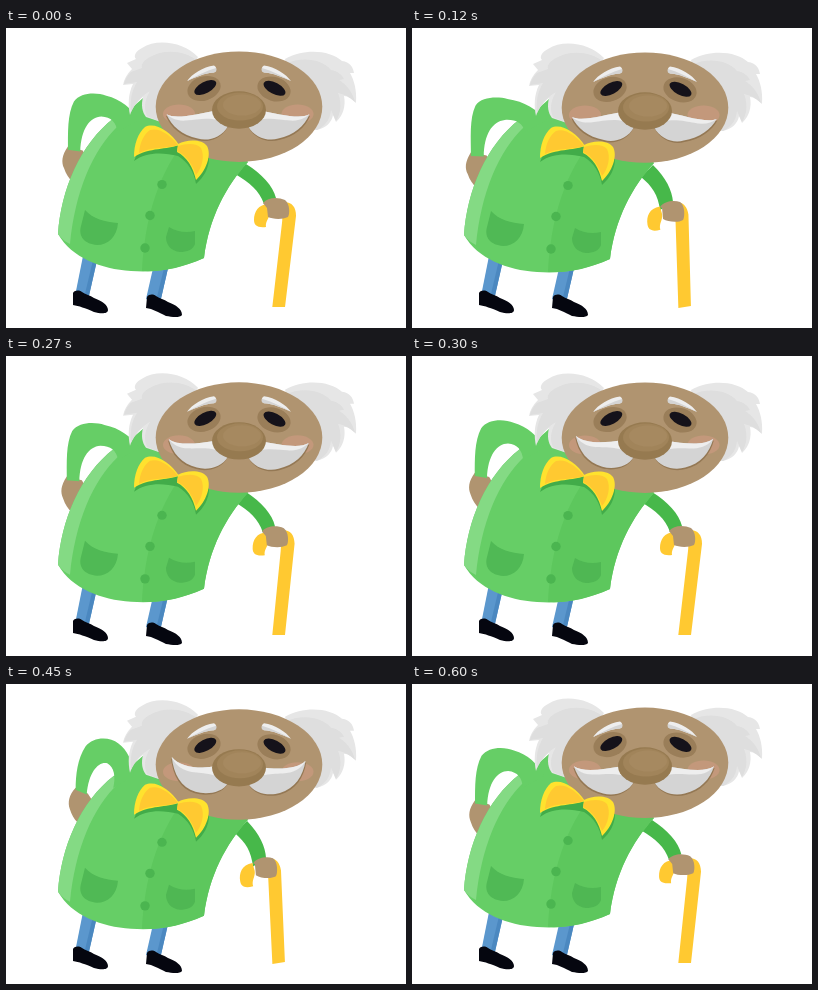
Animation, 400 px wide and 300 px high, one loop 0.63 s. Source, as an HTML page with a canvas:

```html
<!DOCTYPE html>
<html lang="en">
<head>
<meta charset="utf-8">
<title>Old man with a cane</title>
<style>
html, body { margin: 0; width: 400px; height: 300px; overflow: hidden; background: #fff; }
canvas { display: block; }
</style>
</head>
<body>
<canvas id="stage" width="400" height="300"></canvas>
<script>
const ctx = document.getElementById('stage').getContext('2d');
const LOOP = 630, STEP = 30;
const GREEN = '#66ce66', GREEN_SIDE = '#5dc75d', GREEN_DARK = '#4bb550';
const SKIN = '#b09470', SKIN_DARK = '#9a7e59', YELLOW = '#ffe22e', AMBER = '#ffc931';
const HAIR_BACK = '#e6e6e6', HAIR_FRONT = '#dedede';
const NUMBER = /-?\d+(\.\d+)?/g;

function shape(color, d) {
  ctx.fillStyle = color;
  ctx.fill(new Path2D(d));
}

function oval(color, x, y, rx, ry, tilt = 0) {
  ctx.fillStyle = color;
  ctx.beginPath();
  ctx.ellipse(x, y, rx, ry, tilt * Math.PI / 180, 0, Math.PI * 2);
  ctx.fill();
}

function mirrored(width, paint) {
  ctx.save();
  ctx.translate(width, 0);
  ctx.scale(-1, 1);
  paint();
  ctx.restore();
}

// Blends two paths that share the same commands.
function morph(from, to, k) {
  const ends = to.match(NUMBER);
  let i = 0;
  return from.replace(NUMBER, v => (+v + (ends[i++] - v) * k).toFixed(2));
}

// Smooth looping curve through [time, value] keys.
function curve(keys, t) {
  const n = keys.length;
  const at = i => {
    const [time, value] = keys[(i + n) % n];
    return [time + Math.floor(i / n) * LOOP, value];
  };
  const i = keys.findLastIndex(key => key[0] <= t);
  const [a, b, c, d] = [at(i - 1), at(i), at(i + 1), at(i + 2)];
  const span = c[0] - b[0], u = (t - b[0]) / span;
  const m0 = (c[1] - a[1]) / (c[0] - a[0]) * span;
  const m1 = (d[1] - b[1]) / (d[0] - b[0]) * span;
  const u2 = u * u, u3 = u2 * u;
  return b[1] * (2 * u3 - 3 * u2 + 1) + m0 * (u3 - 2 * u2 + u)
    + c[1] * (3 * u2 - 2 * u3) + m1 * (u3 - u2);
}

// Eases in and out between [time, value] keys.
function ease(keys, t) {
  const i = keys.findIndex(key => key[0] > t);
  const [[t0, v0], [t1, v1]] = [keys[i - 1], keys[i]];
  return v0 + (v1 - v0) * (1 - Math.cos(Math.PI * (t - t0) / (t1 - t0))) / 2;
}

const SWING = [[0, 1], [150, -0.1], [300, 1], [450, -0.1], [630, 1]];
const ELBOW = [[0, 0.33], [120, 0.08], [210, 0], [300, 0.4], [390, 1], [510, 0.8], [600, 0.42]];
const LEFT_WHISKER = [[0, 0.08], [120, 0], [210, 0.1], [300, 0.55], [390, 1], [510, 0.55], [600, 0.28]];
const RIGHT_WHISKER = [[0, 0.08], [120, -0.1], [210, -0.25], [300, 0.4], [390, 0.65], [510, 0.55], [600, 0.28]];

function legs() {
  shape('#5b97cd', 'M77 228 L92 228 L82 272 L69 268Z');
  shape('#4b88c0', 'M88 228 L92 228 L82 272 L78 270Z');
  shape('#5b97cd', 'M148 236 L163 236 L154 275 L140 271Z');
  shape('#4b88c0', 'M159 236 L163 236 L154 275 L150 273Z');
  shape('#05060f', 'M67 265 C69 262 73 262 76 264 C80 267 84 267 88 270 C96 273 102 277 102 282 C102 286 95 286 88 284 C79 280 73 278 67 277Z');
  shape('#05060f', 'M141 269 C143 266 147 266 150 268 C154 271 158 271 162 274 C170 277 176 281 176 287 C174 290 166 289 160 288 C152 284 147 281 140 280Z');
}

function caneArm(k) {
  shape('#47b84a', morph(
    'M241 137 C254 150 260 162 261 174 L248 182 C246 167 240 158 229 149Z',
    'M240 136 C256 146 267 158 270 170 L258 176 C253 162 244 155 229 146Z', k));
  ctx.save();
  ctx.translate(273, 279);
  ctx.rotate((k - 1) * 8.5 * Math.PI / 180);
  ctx.translate(-273, -279);
  shape(AMBER, 'M263 176 C252 176 248 184 248 192 C248 197 251 200 260 199 C259 193 264 190 264 184Z');
  shape(AMBER, 'M266.3 279 L276 195 C277 188 276 182 272 174 L278 174 C286 174 290 179 290 188 L279 279Z');
  ctx.restore();
  shape(SKIN, morph(
    'M248 179 C252 173 262 172 268 174 C273 177 273 189 271 192 C266 195 256 194 251 191 L250 180Z',
    'M257 175 C262 169 272 169 279 172 C284 176 284 186 282 189 C276 192 266 191 262 189 L261 180Z', k));
}

function backHand(k) {
  shape(SKIN, morph(
    'M58 126 C52 136 52 142 55 148 C57 154 60 158 64 162 L80 140 L74 129Z',
    'M70 103 C63 110 62 118 64 124 C66 130 68 134 72 138 L88 118 L82 109Z', k));
}

function backArm(k) {
  shape(GREEN, morph(
    'M58 130 C58 112 56 92 62 79 C68 70 84 70 94 72 C112 74 124 82 136 92 L114 104 C110 95 104 92 92 93 C79 95 71 108 71 130Z',
    'M70 105 C70 90 72 74 80 62 C88 52 104 52 113 59 C122 66 126 76 128 92 L107 104 C110 92 108 83 102 79 C94 76 83 86 81 110Z', k));
}

function coat() {
  shape(GREEN, 'M52 206 C55 162 74 116 108 90 C118 86 126 80 137 70 L200 60 L242 134 C220 158 203 190 198 230 C172 241 150 245 125 243 C95 241 66 230 52 206Z');
  shape(GREEN_SIDE, 'M136 243 C138 205 146 160 172 122 L242 134 C220 158 203 190 198 230 C176 240 156 244 136 243Z');
  shape('#84da84', 'M52 206 C55 162 74 116 108 90 L113 97 C86 122 69 165 64 216 Q57 213 52 206Z');
  oval(GREEN_DARK, 156, 156.5, 4.7, 4.5);
  oval(GREEN_DARK, 144, 187.5, 4.7, 4.7);
  oval(GREEN_DARK, 139, 220, 4.7, 4.7);
  shape('#50b955', 'M79 182 C87 191 99 194 112 195 C111 209 102 217 91 217 C79 216 72 209 75 198Z');
  shape('#4fb753', 'M163 199 C171 204 180 205 189 203 L189 216 C187 222 181 224 174 224 C165 223 160 217 160 209Z');
}

function bowTie() {
  shape('#42ac49', 'M128 133 C140 124 156 124 172 128 C182 134 188 144 190 156 C198 149 203 140 203 130 L172 118 L134 118Z');
  shape(YELLOW, 'M128 129 C128 116 132 105 139 99 C149 94 164 103 173 117 C161 122 144 119 128 129Z');
  shape(YELLOW, 'M172 116 C181 111 196 111 201 118 C206 127 200 143 190 152 C187 139 181 129 171 124Z');
  shape(AMBER, 'M133 125 C134 114 138 106 144 102 C154 99 165 108 172 117 C160 121 147 118 133 125Z');
  shape(AMBER, 'M172 118 C181 115 191 115 195 120 C199 128 196 140 190 147 C186 136 181 128 171 123Z');
}

function hair() {
  shape(HAIR_BACK, 'M192 29 C178 14 151 10 136 20 C130 23 127 28 130 31 L121 35 L126 41 C121 46 118 51 117 57 L127 56 C122 66 122 77 124 87 C127 78 131 73 137 69 C135 77 136 84 140 89 L155 94Z');
  shape(HAIR_FRONT, 'M192 33 C178 22 158 21 144 29 C138 32 135 36 136 40 L125 44 C121 48 119 52 118 56 L131 54 C125 64 124 74 125 84 C130 74 137 67 144 63 C138 73 138 81 141 88 L155 94Z');
  shape(HAIR_BACK, 'M279 31 C298 20 324 22 336 33 C344 34 347 39 348 45 L344 45 C348 52 351 62 350 75 C346 71 342 68 338 68 C340 78 337 88 330 94 L327 87 C326 94 320 100 311 102 L300 100Z');
  shape(HAIR_FRONT, 'M279 36 C296 28 316 31 325 42 C332 43 336 47 338 51 L333 52 C341 57 347 65 349 74 C344 69 338 66 332 65 C336 75 335 85 330 93 L325 82 C324 92 319 98 311 102 L300 100Z');
}

function brow() {
  shape('#eeeeee', 'M181 53 C186 46 197 39 208 37.5 C211 39 211 43 208 44.5 C199 45 190 49 181 53Z');
  shape('#d4d4d4', 'M181 53 C190 48 200 43 210 40 C211 43 210 44 208 44.5 C199 45 190 49 181 53Z');
}

const MUSTACHE = [
  'M160 88 C170 93 192 86 210 83 L233 96 L222 98 C216 110 202 114 192 111 C176 108 165 99 160 88Z',
  'M167 67.5 C174 78 192 83 210 80 L233 96 L222 97 C216 107 200 108 189 105 C175 100 168 86 167 67.5Z'];
const MUSTACHE_TOP = [
  'M160 88 C170 93 192 86 210 83 L233 96 L222 98 C210 87 192 92 182 93 C172 95 165 92 160 88Z',
  'M167 67.5 C174 78 192 83 210 80 L233 96 L222 97 C210 86 196 87 184 84 C175 81 169 75 167 67.5Z'];

function whisker(k) {
  const side = morph(...MUSTACHE, k);
  ctx.save();
  ctx.translate(-0.7, 1.5);
  shape('#947854', side);
  ctx.restore();
  shape('#d4d4d4', side);
  shape('#eeeeee', morph(...MUSTACHE_TOP, k));
}

function head(left, right) {
  hair();
  oval(SKIN, 233, 78.7, 83.3, 55.2);
  oval('#c3987b', 173, 86, 16, 9.5);
  oval('#c3987b', 291.5, 86, 16, 9.5);
  oval(SKIN_DARK, 198, 60.5, 17, 12, -18);
  oval(SKIN_DARK, 268, 61, 17, 12, 18);
  oval('#15121a', 199.3, 59.5, 12, 5.7, -28);
  oval('#15121a', 268.5, 60.3, 12, 5.7, 28);
  brow();
  mirrored(466, brow);
  whisker(left);
  mirrored(464, () => whisker(right));
  oval('#967a50', 233, 82, 27, 18.7);
  oval('#a1845a', 234, 78.5, 23, 14);
  oval('#a68960', 236, 77, 19, 10.5);
}

function draw(t) {
  const bob = 1.5 * (1 - Math.cos(2 * Math.PI * t / LOOP));
  const elbow = curve(ELBOW, t);
  ctx.fillStyle = '#fff';
  ctx.fillRect(0, 0, 400, 300);
  legs();
  caneArm(ease(SWING, t));
  backHand(elbow);
  ctx.save();
  ctx.translate(0, bob);
  coat();
  ctx.restore();
  backArm(elbow);
  ctx.save();
  ctx.translate(0, bob);
  head(curve(LEFT_WHISKER, t), curve(RIGHT_WHISKER, t));
  bowTie();
  ctx.restore();
}

const start = performance.now();
function tick() {
  const t = (performance.now() - start) % LOOP;
  draw(Math.floor(t / STEP) * STEP);
  requestAnimationFrame(tick);
}
tick();
</script>
</body>
</html>
```
